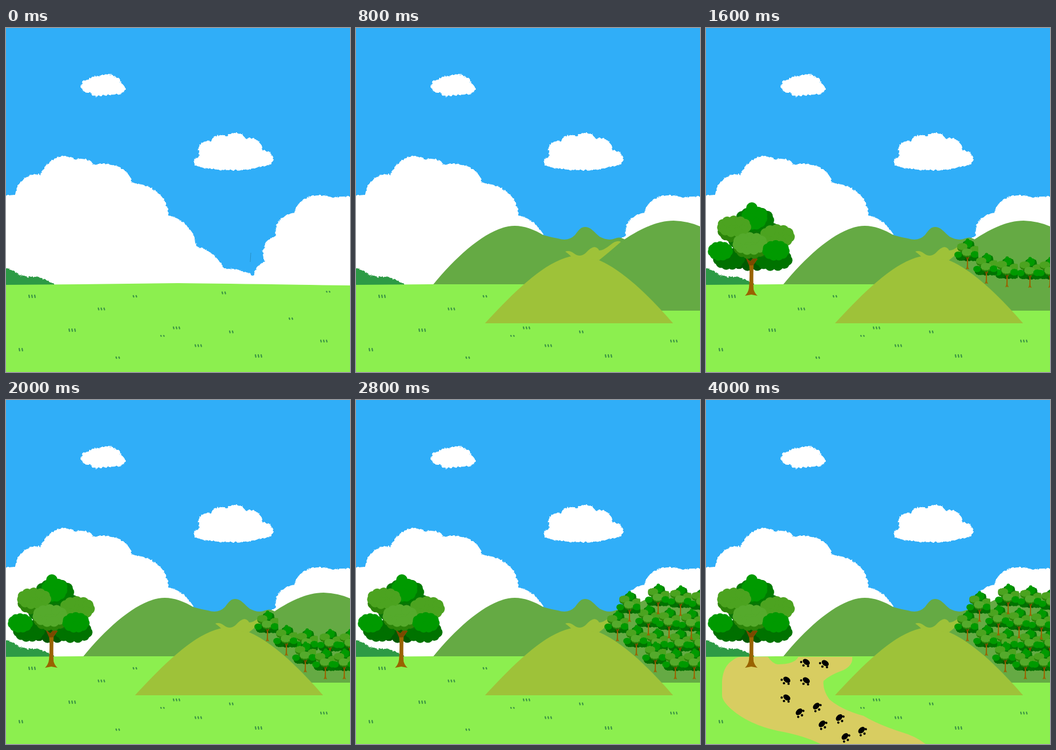
Animation of 600 by 600 pixels, one loop 4.4 s. Source, as an HTML page:

```html
<!DOCTYPE html>
<html lang="en">
<head>
<meta charset="utf-8">
<title>Countryside</title>
<style>
html, body { margin: 0; width: 100%; height: 100%; overflow: hidden; background: #30aef8; }
svg { display: block; width: 100vw; height: 100vh; }
</style>
</head>
<body>
<svg viewBox="0 0 600 600">
  <defs>
    <filter id="rough" filterUnits="userSpaceOnUse" x="-20" y="0" width="640" height="620" color-interpolation-filters="sRGB">
      <feTurbulence type="fractalNoise" baseFrequency=".22" numOctaves="2" seed="4"/>
      <feDisplacementMap in="SourceGraphic" scale="5" xChannelSelector="R" yChannelSelector="G"/>
    </filter>
    <clipPath id="crop"><path d="M0 300H141V470H0Z"/></clipPath>
    <g id="tree"></g>
    <g id="paw">
      <ellipse cx="1" cy="-2" rx="6.8" ry="4.6" transform="rotate(35)"/>
      <circle cx="-7" cy="-1" r="2"/><circle cx="-3" cy="5" r="2.1"/><circle cx="5" cy="6" r="2"/>
    </g>
  </defs>

  <rect width="600" height="600" fill="#30aef8"/>
  <path d="M427 392L426 408" stroke="#2890c4"/>
  <g filter="url(#rough)">
    <g fill="#fff">
      <path d="M131 103Q131 91 144 90Q150 82 162 85Q168 80 176 81Q188 80 192 87Q199 88 200 95Q208 101 208 107Q204 116 190 116Q172 117 160 119Q150 118 147 113Q132 114 131 103Z"/>
      <path d="M328 233Q330 226 338 222Q332 207 342 200Q350 196 357 198Q362 187 373 187Q380 186 385 189Q390 182 403 182Q414 184 418 193Q432 190 440 197Q448 204 447 212Q465 217 466 230Q464 240 440 243Q420 248 392 248Q350 247 334 241Q327 238 328 233Z"/>
      <path d="M-10 293L16 291Q18 274 30 264Q42 254 60 255Q67 237 85 228Q105 218 121 229Q143 225 154 239Q180 232 200 244Q217 254 220 270Q248 272 266 288Q282 303 284 327Q308 333 320 350Q331 363 332 381Q350 385 363 397Q375 408 380 419Q410 419 432 432Q436 414 451 407Q444 390 454 374Q461 366 470 363Q467 345 480 332Q490 324 503 322Q508 303 526 295Q548 288 571 296Q588 292 610 295V460H-10Z"/>
    </g>
    <path fill="#2d9a45" d="M-10 415L14 424L22 430L38 435L45 433L62 436L85 447V455H-10Z"/>
  </g>
  <path fill="#8cef4f" d="M0 448Q150 447 300 445Q400 446 600 449V600H0Z"/>
  <g id="tufts" stroke="#3b9444" stroke-width="2.2" stroke-linecap="round"></g>

  <g data-at="400" fill="#65aa44">
    <path d="M135 447C180 392 235 345 277 345C310 345 345 370 385 407L430 447Z"/>
    <path d="M400 422C460 370 510 336 554 336Q580 337 600 346V493H400Z"/>
  </g>
  <path data-at="800" fill="#65aa44" d="M326 361Q340 365 352 367Q370 373 382 361C390 350 393 347 400 347C410 347 416 357 425 364Q440 372 452 367Q460 363 469 369L440 410H370Z"/>
  <path data-at="400" fill="#9ec239" d="M225 515C280 455 340 397 388 397C440 397 500 455 553 515Z"/>
  <path data-at="800" fill="#9ec239" d="M365 390Q372 387 380 393Q390 401 400 393Q410 382 416 382Q422 383 424 388Q432 388 444 378Q455 369 462 373Q445 388 424 405L376 400Q375 397 365 390Z"/>

  <path data-at="3200" fill="#d8cd61" d="M60 448H108Q116 460 125 461Q155 461 161 448H255Q257 462 240 471Q215 480 205 490Q203 505 215 522Q235 540 275 551Q300 566 340 579Q365 586 383 600H200Q170 585 125 577Q75 566 45 540Q28 525 28 515V490Q30 465 45 455Q52 449 60 448Z"/>
  <use data-at="1200" href="#tree"/>
  <g id="grove"></g>
  <g id="paws"></g>
</svg>
<script>
const LOOP = 4400;
const byId = id => document.getElementById(id);

// A leafy mass: an ellipse ringed with round lobes.
function clump(x, y, rx, ry, fill, lobes = 11) {
  const r = Math.min(rx, ry) * 0.46;
  let s = `<g fill="${fill}"><ellipse cx="${x}" cy="${y}" rx="${rx - r * .7}" ry="${ry - r * .7}"/>`;
  for (let i = 0; i < lobes; i++) {
    const a = i / lobes * 2 * Math.PI - 1.6;
    s += `<circle cx="${x + (rx - r) * Math.cos(a)}" cy="${y + (ry - r) * Math.sin(a)}" r="${r}"/>`;
  }
  return s + '</g>';
}

byId('tree').innerHTML =
  clump(80, 403, 40, 21, '#005a00') +
  clump(40, 402, 28, 20, '#007000') +
  clump(118, 404, 33, 20, '#007300') +
  clump(86, 365, 48, 36, '#0b7406') +
  clump(85, 334, 34, 22, '#007c00') +
  clump(84, 331, 23, 21, '#009a00') +
  '<circle cx="80" cy="314" r="10" fill="#009a00"/><circle cx="97" cy="325" r="10" fill="#009a00"/>' +
  clump(48, 353, 28, 21, '#2c8509') +
  clump(49, 346, 30, 19, '#4ca320') +
  clump(124, 363, 31, 21, '#4ca320') +
  '<path fill="#996300" d="M69 400L77 407L84 400L90 403L83 413Q82 440 83 456Q85 463 90 467L79 465L68 467Q74 461 75 453Q77 425 75 412Z"/>' +
  '<path fill="#7a4a00" d="M69 400L77 407L84 400L90 403L82 414H75Z"/>' +
  clump(78, 383, 30, 20, '#2c8509') +
  clump(77, 376, 31, 20, '#55aa2c') +
  clump(25, 389, 22, 17, '#009a00') +
  clump(122, 388, 24, 18, '#009a00');

byId('tufts').innerHTML = [
  [40, 468, 3, 4], [222, 468, 2, 2], [377, 462, 2, 3], [559, 460, 2, 1], [161, 490, 3, 3],
  [110, 527, 3, 4], [494, 507, 2, 2], [292, 523, 3, 3], [270, 537, 2, 1], [390, 530, 2, 3],
  [330, 554, 3, 3], [549, 546, 3, 3], [23, 561, 2, 4], [192, 575, 2, 2], [435, 572, 3, 4]
].map(([x, y, n, h]) => Array.from({ length: n }, (_, i) =>
  `<path d="M${x + i * 5} ${y - h / 2}l.8 ${h}"/>`).join('')).join('');

// Foot of each trunk, grouped by time of appearance.
const grove = {
  1600: [[525, 452], [565, 453], [600, 453], [456, 421], [489, 446]],
  2000: [[522, 475], [557, 487], [590, 487]],
  2400: [[510, 411], [546, 416], [585, 418]],
  2800: [[477, 387], [527, 374], [566, 377], [603, 381]]
};
const paws = {
  3600: [[173, 458], [206, 460], [139, 489], [173, 490], [139, 520]],
  4000: [[163, 546], [193, 536], [203, 567], [233, 556], [243, 589], [272, 578]]
};
const stages = (sets, draw) => Object.entries(sets).map(([at, spots]) =>
  `<g data-at="${at}">${spots.map(([x, y]) => draw(x, y, +at)).join('')}</g>`).join('');

byId('grove').innerHTML = stages(grove, (x, y) =>
  `<g transform="translate(${x} ${y}) scale(.3 .33) translate(-79 -467)"><use href="#tree" clip-path="url(#crop)"/></g>`);
byId('paws').innerHTML = stages(paws, (x, y, at) =>
  `<use href="#paw" transform="translate(${x} ${y}) rotate(${at < 4000 ? 0 : -80})"/>`);

const timed = [...document.querySelectorAll('[data-at]')];
function frame(now) {
  const t = now % LOOP;
  for (const el of timed) el.style.display = t >= +el.dataset.at ? '' : 'none';
  requestAnimationFrame(frame);
}
frame(0);
</script>
</body>
</html>
```
